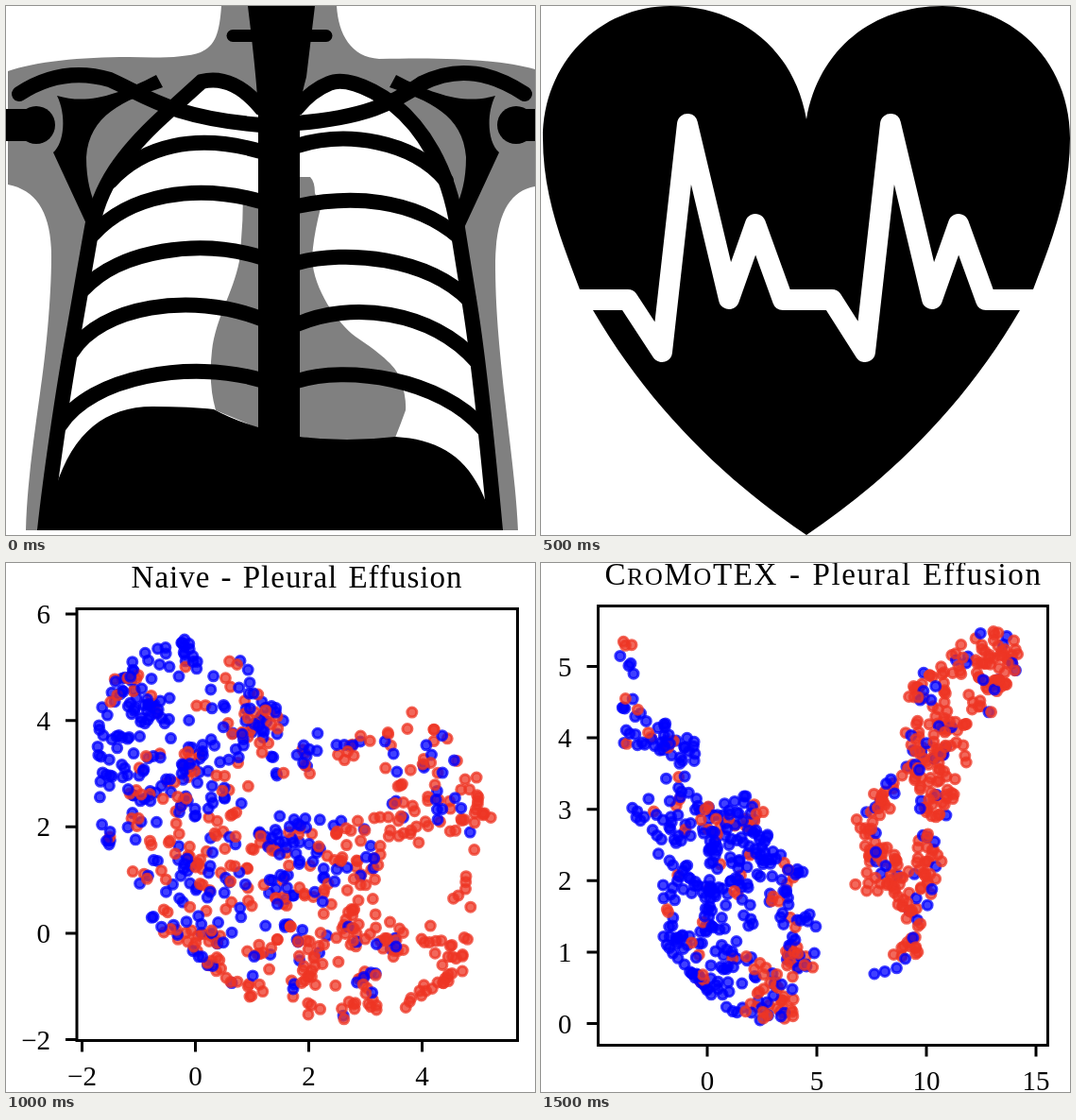
Animation, 560 px wide and 560 px high, one loop 2000 ms. Source, as an HTML page:

```html
<!DOCTYPE html>
<html lang="en">
<head>
<meta charset="utf-8">
<title>Chest, heart and embeddings</title>
<style>
html, body { margin: 0; width: 100%; height: 100%; overflow: hidden; background: #fff; }
svg { display: block; width: 100%; height: 100%; }
.scene { display: none; }
.bone { fill: none; stroke: #000; stroke-width: 16; stroke-linecap: round; }
.gray { fill: #808080; }
.axis { fill: none; stroke: #000; stroke-width: 3; }
text { font-family: "Liberation Serif", "Times New Roman", serif; font-size: 29px; }
.title { font-size: 33px; letter-spacing: .03em; word-spacing: .06em; text-anchor: middle; }
.small { font-size: 26px; }
.dot { fill-opacity: .75; stroke-opacity: .75; stroke-width: 3; }
.red { fill: #ee3524; stroke: #ee3524; }
.blue { fill: #00f; stroke: #00f; }
</style>
</head>
<body>
<svg viewBox="0 0 560 560">
  <g class="scene">
    <path class="gray" d="M228 0C226 28 222 42 206 49C190 55 160 55 130 54C80 54 30 59 2 69V189C33 195 48 220 48 265C48 310 42 370 36 410C29 460 22 510 21 555H542C540 510 533 460 528 415C522 360 518 320 518 270C519 222 532 196 560 191V67C525 57 470 54 395 56C365 54 352 30 350 0Z"/>
    <path class="bone" style="fill:#fff" d="M41 555C47 500 60 410 70 355L90 240C98 190 125 155 165 118L207 80C230 74 252 86 270 108L285 115V555M518 555C512 490 500 370 490 310L478 235C468 170 440 128 410 104C380 82 355 76 342 82Q324 89 308 108L290 115V555"/>
    <path class="gray" d="M267 198H251Q251 235 247 270C240 305 222 330 218 365Q214 400 222 428L267 447ZM311 181H322Q327 186 327 198L333 214Q325 245 324 268C326 300 350 335 370 350C400 370 414 383 418 396Q424 415 423 428Q418 442 412 457Q360 464 311 456Z"/>
    <path d="M52 512C70 452 105 424 155 424Q195 424 220 427Q240 438 267 446L311 456Q360 462 412 456C460 459 490 478 508 525L526 555H33Z"/>
    <path class="bone" d="M110 186C145 148 200 134 270 154M92 242C130 200 200 187 270 207M82 300C120 258 205 246 270 266M70 366C100 318 195 302 270 331M57 444C90 392 195 374 270 396M308 148C360 132 430 142 466 185M308 212C365 200 430 203 479 244M308 272C360 258 445 266 490 311M308 337C365 312 450 322 498 376M308 397C360 380 460 394 506 448"/>
    <path class="bone" d="M14 93C40 76 72 67 110 78C150 96 175 118 270 126M549 93C515 71 480 62 440 82C410 103 380 118 308 124"/>
    <g id="shoulder">
      <path d="M54 95C85 104 115 96 159 73L166 86C125 100 88 115 85 160C85 185 90 200 96 215L88 237L50 155C62 145 64 115 54 95Z"/>
      <circle cx="32" cy="126" r="20"/><path d="M0 109H32V143H0Z"/>
    </g>
    <use href="#shoulder" transform="matrix(-1 0 0 1 572 0)"/>
    <path d="M256 0H327L318 75C313 95 311 100 311 120V470H267V115C266 85 262 50 256 0Z"/>
    <path class="bone" style="stroke-width:13" d="M240 31.500H339"/>
    <path fill="#fff" d="M0 555H560V570H0Z"/>
  </g>
  <g class="scene">
    <path id="half" d="M281 120C268 45 210 0 137 0C62 0 2 60 2 140C2 200 22 250 41 300L55 322C115 425 195 502 281 560Z"/>
    <use href="#half" transform="matrix(-1 0 0 1 562 0)"/>
    <path d="M280 120h2V559h-2Z"/>
    <path fill="none" stroke="#fff" stroke-width="22" stroke-linejoin="round" d="M20 311H92L128 366L155 125L199 310L227 231L256 311H308L343 366L370 125L414 310L442 231L471 311H550"/>
  </g>
  <g class="scene" id="naive">
    <text class="title" x="308" y="26">Naive - Pleural Effusion</text>
  </g>
  <g class="scene" id="cross">
    <text class="title" x="299" y="23" style="letter-spacing:.05em">C<tspan class="small">RO</tspan>M<tspan class="small">O</tspan>TEX - Pleural Effusion</text>
  </g>
</svg>
<script>
const NS = "http://www.w3.org/2000/svg";
const scenes = [...document.querySelectorAll(".scene")];
const pen = document.createElement("canvas").getContext("2d");

function add(parent, tag, attrs, text) {
  const node = document.createElementNS(NS, tag);
  for (const key in attrs) node.setAttribute(key, attrs[key]);
  if (text !== undefined) node.textContent = text;
  parent.append(node);
}

function seeded(seed) {
  return () => {
    seed = (seed + 0x6D2B79F5) | 0;
    let h = Math.imul(seed ^ (seed >>> 15), 1 | seed);
    h = (h + Math.imul(h ^ (h >>> 7), 61 | h)) ^ h;
    return ((h ^ (h >>> 14)) >>> 0) / 4294967296;
  };
}

const bump = (x, y, cx, cy, r) => Math.exp(-((x - cx) ** 2 + (y - cy) ** 2) / (2 * r * r));

// Fills an outline (inner loops are gaps) with small random clumps of dots.
function scatter(group, outline, clumps, redness, seed) {
  const rnd = seeded(seed);
  const shape = new Path2D(outline);
  const inside = p => pen.isPointInPath(shape, p.x, p.y, "evenodd");
  function pick(make) {
    let p;
    do p = make(); while (!inside(p));
    return p;
  }
  for (let i = 0; i < clumps; i++) {
    const hub = pick(() => ({ x: 560 * rnd(), y: 560 * rnd() }));
    const size = 1 + Math.floor(4 * rnd() * rnd() + rnd());
    for (let j = 0; j < size; j++) {
      const { x, y } = pick(() => ({ x: hub.x + 24 * (rnd() - .5), y: hub.y + 24 * (rnd() - .5) }));
      const color = rnd() < redness(x, y) ? "red" : "blue";
      add(group, "circle", { class: "dot " + color, cx: x.toFixed(1), cy: y.toFixed(1), r: 5 });
    }
  }
}

const label = n => String(n).replace("-", "\u2212");

function axes(group, box, xs, ys) {
  const [left, top, right, bottom] = box;
  let d = `M${left} ${top}H${right}V${bottom}H${left}Z`;
  for (let i = 0; i < xs.count; i++) {
    const x = xs.at + i * xs.gap;
    d += `M${x} ${bottom}v12`;
    add(group, "text", { x, y: bottom + 47, "text-anchor": "middle" }, label(xs.from + i * xs.step));
  }
  for (let i = 0; i < ys.count; i++) {
    const y = ys.at - i * ys.gap;
    d += `M${left} ${y}h-12`;
    add(group, "text", { x: left - 28, y: y + 10, "text-anchor": "end" }, label(ys.from + i * ys.step));
  }
  add(group, "path", { class: "axis", d });
}

const crescent = "M185 68L212 108L238 99L273 106L260 135L300 158L345 185L395 178L425 154L470 185L495 220L519 255L516 296L496 330L494 372L486 430L440 476L400 486L300 480L235 448L190 408L140 382L140 340L120 312L100 300L95 240L96 155L135 84Z" +
  "M400 298L484 300L480 345L435 400L390 368Z" +
  "M232 285L258 246L300 225L400 215L400 262L360 270L320 255L270 275Z" +
  "M390 450L420 420L470 412L430 460Z";

const westArm = "M80 78H101L100 140L130 168L166 188L156 248L232 242L242 285L258 314L282 318L270 345L288 378L306 396L292 430L270 438L272 482L215 486L160 442L124 402L128 322L98 272L92 215L112 205L88 192L84 130Z" +
  "M118 215L138 210L128 238ZM152 290L175 290L170 330L160 335Z" +
  "M145 345L175 360L165 395L142 380ZM215 395L245 360L262 405L240 412Z";

const eastArm = "M312 378L330 332L350 322L333 268L370 220L394 205L376 180L387 128L430 95L470 70L500 69L515 100L488 135L474 165L450 155L452 215L434 278L412 268L426 312L412 355L398 418L355 443L352 432L394 395L370 352L335 352Z" +
  "M372 252L393 225L402 290L380 315L362 295ZM430 130L456 110L448 152L430 168Z";

const naive = document.getElementById("naive");
scatter(naive, crescent, 405, (x, y) =>
  Math.min(.88, Math.max(.12, .0016 * x + .0017 * y - .36)) - .4 * bump(x, y, 310, 300, 45), 11);
axes(naive, [75, 48.5, 541.5, 505.5],
  { at: 80.5, gap: 120, from: -2, step: 2, count: 4 },
  { at: 504.5, gap: 112.6, from: -2, step: 2, count: 5 });

const cross = document.getElementById("cross");
scatter(cross, westArm, 225, (x, y) =>
  .16 + .6 * bump(x, y, 262, 455, 28) + .35 * bump(x, y, 90, 78, 14), 29);
scatter(cross, eastArm, 185, (x, y) => .84 - .7 * bump(x, y, 355, 438, 14), 5);
axes(cross, [60.5, 45.5, 536.5, 510.5],
  { at: 176, gap: 116, from: 0, step: 5, count: 4 },
  { at: 487.5, gap: 75.6, from: 0, step: 1, count: 6 });

function render(ms) {
  const now = Math.floor((ms % 2000) / 500);
  scenes.forEach((s, i) => { s.style.display = i === now ? "inline" : "none"; });
}

function tick() {
  render(performance.now());
  requestAnimationFrame(tick);
}
tick();
</script>
</body>
</html>
```
